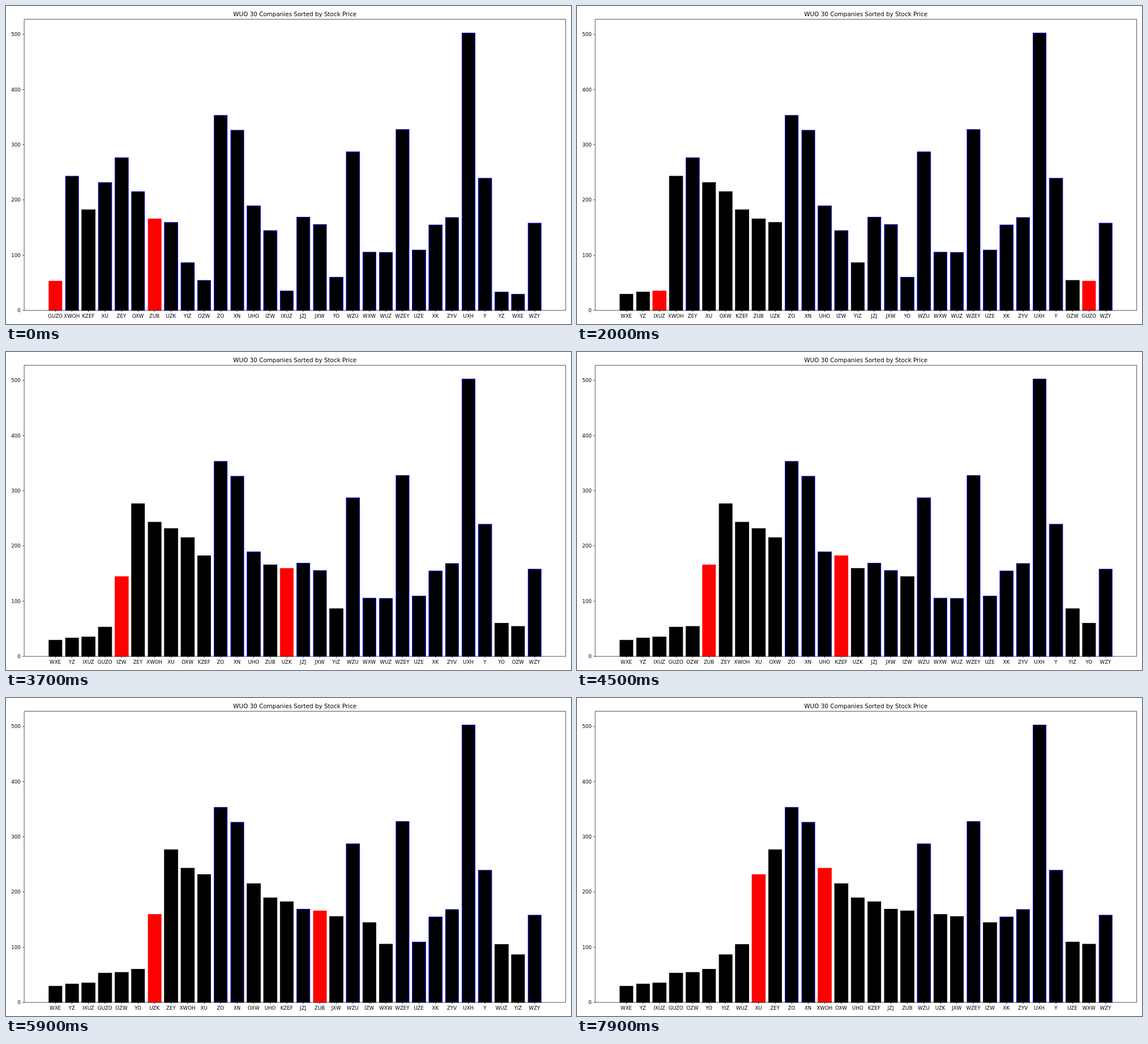
Animation, 998 px wide and 561 px high, one loop 8 s. Source, as an HTML page:

```html
<!DOCTYPE html>
<html lang="en">
<head>
<meta charset="utf-8">
<title>Exchange sort</title>
<style>
  html, body { margin: 0; width: 100%; height: 100%; overflow: hidden; background: #fff; }
  svg { display: block; width: 100%; height: 100%; }
  text { font: 13.89px "DejaVu Sans", sans-serif; fill: #000; text-anchor: middle; }
  .title { font-size: 16.67px; }
  .value { text-anchor: end; }
  .axis { fill: none; stroke: #000; stroke-width: 1.11; }
  .bar { fill: #000; stroke: #00f; stroke-width: 1.39; }
  .bar.done { stroke: #000; }
  .bar.hot { fill: #f00; stroke: #f00; }
</style>
</head>
<body>
<svg viewBox="0 0 1600 900" preserveAspectRatio="none"></svg>
<script>
const STEP = 100, STEPS = 80;
const data = Object.entries({
  KZEF: 182, XWOH: 243, ZUB: 165.4, XU: 231.5, ZEY: 276.2, OXW: 214.8,
  GUZO: 52.7, UZK: 159, YIZ: 86, OZW: 54.5, ZO: 353, XN: 326,
  UHO: 189, IZW: 144.2, IXUZ: 35.2, JZJ: 169, JXW: 155.6, YO: 60.2,
  WZU: 287, WXW: 105.2, WUZ: 105, WZEY: 327.5, UZE: 109, XK: 155,
  ZYV: 168.5, UXH: 502.4, Y: 239, YZ: 33, WXE: 29.6, WZY: 158.2
}).map(([name, price]) => ({ name, price }));

// Chart geometry on a 1600 x 900 figure
const plot = { left: 51.2, right: 1585, top: 37, bottom: 861.3 };
const pitch = (plot.right - plot.left) / 32.78;
const scale = (plot.bottom - plot.top) / (502.4 * 1.05);
const centre = i => plot.left + (i + 1.89) * pitch;
const snap = v => Math.round(v) + 0.5;
const level = v => snap(plot.bottom - v * scale - 0.5);

const svg = document.querySelector("svg");

function add(tag, attrs, text = "") {
  const el = document.createElementNS("http://www.w3.org/2000/svg", tag);
  for (const key in attrs) el.setAttribute(key, attrs[key]);
  el.textContent = text;
  return svg.appendChild(el);
}

// One state per swap of an exchange sort
function sortStates(items) {
  const list = items.slice(), touched = new Set(), states = [];
  for (let i = 0; i < list.length; i++) {
    for (let j = i + 1; j < list.length; j++) {
      if (list[j].price >= list[i].price) continue;
      [list[i], list[j]] = [list[j], list[i]];
      touched.add(i).add(j);
      states.push({ list: list.slice(), touched: new Set(touched), pair: [i, j] });
    }
  }
  return states;
}

// The loop opens on the second swap
const states = sortStates(data).slice(1, STEPS + 1);

const baseY = level(0), axisX = snap(plot.left);
const bars = data.map((_, i) => {
  const x = snap(centre(i) - 0.4 * pitch);
  return add("rect", { x, width: snap(centre(i) + 0.4 * pitch) - x });
});
const labels = data.map((_, i) => add("text", { x: centre(i), y: 882 }));

data.forEach((_, i) =>
  add("path", { class: "axis", d: `M${snap(centre(i))} ${baseY}v4.86` }));
for (let v = 0; v <= 500; v += 100) {
  const y = level(v);
  add("path", { class: "axis", d: `M${axisX} ${y}h-4.86` });
  add("text", { class: "value", x: plot.left - 9.72, y: y + 5 }, v);
}
add("path", { class: "axis", d: `M${axisX} ${snap(plot.top - 0.5)}H${plot.right}V${baseY}H${axisX}Z` });
add("text", { class: "title", x: (plot.left + plot.right) / 2, y: 28.5 },
  "WUO 30 Companies Sorted by Stock Price");

let shown = -1;

function draw(step) {
  const { list, touched, pair } = states[step];
  list.forEach(({ name, price }, i) => {
    const y = level(price);
    bars[i].setAttribute("y", y);
    bars[i].setAttribute("height", baseY - y);
    bars[i].setAttribute("class", pair.includes(i) ? "bar hot" : touched.has(i) ? "bar done" : "bar");
    labels[i].textContent = name;
  });
}

const start = performance.now();

function tick() {
  const step = Math.floor((performance.now() - start) / STEP) % STEPS;
  if (step !== shown) draw(shown = step);
  requestAnimationFrame(tick);
}
tick();
</script>
</body>
</html>
```
